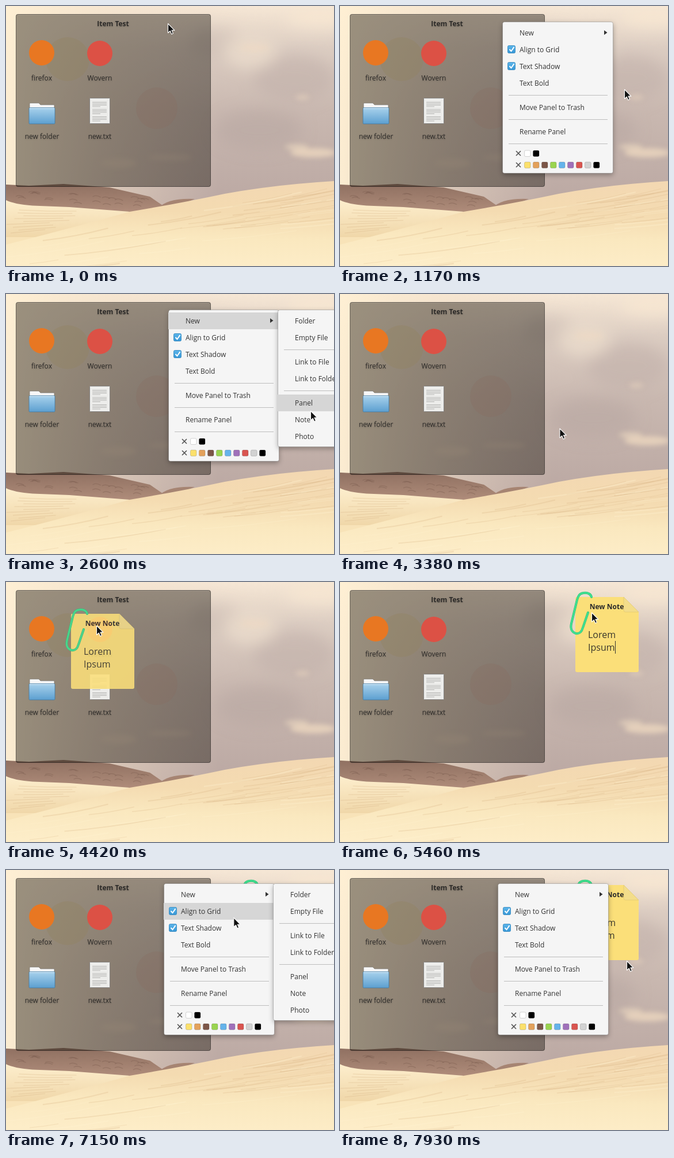
An HTML page for the animation above (8 s loop, 570 px wide and 450 px high).

```html
<!DOCTYPE html>
<html lang="en">
<head>
<meta charset="utf-8">
<title>Desktop panel</title>
<style>
html, body { margin: 0; width: 100%; height: 100%; overflow: hidden; background: #f8e3b8; }
svg { display: block; width: 570px; height: 450px; }
text { font: 12px "Open Sans", "Noto Sans", sans-serif; fill: #333; }
.bold { font-weight: 700; fill: #2b2b2b; }
.mid { text-anchor: middle; }
.body { font-size: 16px; fill: #3b382c; }
.label { fill: #2d2b29; filter: drop-shadow(0 1px 1px rgba(0,0,0,.2)); }
.pop { filter: drop-shadow(0 3px 4px rgba(0,0,0,.32)); }
</style>
</head>
<body>
<svg viewBox="0 0 570 450">
  <defs>
    <linearGradient id="sky" x1="0" y1="0" x2="0" y2="1">
      <stop offset="0" stop-color="#f6e7d5"/>
      <stop offset=".2" stop-color="#dccdc2"/>
      <stop offset=".5" stop-color="#c9b8b0"/>
      <stop offset="1" stop-color="#b9a6a1"/>
    </linearGradient>
    <linearGradient id="glow">
      <stop offset="0" stop-color="#fff0d4" stop-opacity=".95"/>
      <stop offset=".3" stop-color="#f8e6cc" stop-opacity=".5"/>
      <stop offset=".65" stop-color="#f3dfcb" stop-opacity="0"/>
    </linearGradient>
    <linearGradient id="hill" x1="0" y1="0" x2="0" y2="1">
      <stop offset="0" stop-color="#8f7061"/>
      <stop offset="1" stop-color="#b08d7b"/>
    </linearGradient>
    <linearGradient id="flat" x1="0" y1="0" x2="0" y2="1">
      <stop offset="0" stop-color="#fdeecd"/>
      <stop offset="1" stop-color="#f0d7a9"/>
    </linearGradient>
    <linearGradient id="dune" x1=".5" y1="0" x2=".4" y2="1">
      <stop offset="0" stop-color="#f3d8b2"/>
      <stop offset=".35" stop-color="#f4dbb1"/>
      <stop offset=".65" stop-color="#fae8bf"/>
      <stop offset="1" stop-color="#fdedc8"/>
    </linearGradient>
    <linearGradient id="folder" x1="0" y1="0" x2="0" y2="1">
      <stop offset="0" stop-color="#a9d2ec"/>
      <stop offset="1" stop-color="#5c9fd0"/>
    </linearGradient>
    <linearGradient id="check" x1="0" y1="0" x2="0" y2="1">
      <stop offset="0" stop-color="#5cb5ea"/>
      <stop offset="1" stop-color="#3697d6"/>
    </linearGradient>
    <filter id="soft" x="-50%" y="-50%" width="200%" height="200%"><feGaussianBlur stdDeviation="13"/></filter>
    <filter id="haze" x="-50%" y="-50%" width="200%" height="200%"><feGaussianBlur stdDeviation="4"/></filter>
  </defs>

  <rect width="570" height="365" fill="url(#sky)"/>
  <rect width="570" height="365" fill="url(#glow)"/>
  <g filter="url(#soft)">
    <ellipse cx="365" cy="65" rx="45" ry="28" fill="#cfc0b6" opacity=".6"/>
    <ellipse cx="500" cy="125" rx="70" ry="40" fill="#c2b1aa" opacity=".6"/>
    <ellipse cx="425" cy="78" rx="46" ry="30" fill="#ecddcc" opacity=".8"/>
    <ellipse cx="545" cy="20" rx="60" ry="18" fill="#f8e8d3" opacity=".8"/>
    <ellipse cx="440" cy="215" rx="75" ry="35" fill="#b9a8a4" opacity=".6"/>
  </g>
  <g filter="url(#haze)" fill="#efdac1">
    <ellipse cx="534" cy="254" rx="40" ry="8" opacity=".75"/>
    <ellipse cx="505" cy="244" rx="20" ry="5" opacity=".6"/>
    <ellipse cx="195" cy="272" rx="32" ry="8" opacity=".4"/>
    <ellipse cx="285" cy="262" rx="38" ry="5" opacity=".35"/>
    <ellipse cx="515" cy="158" rx="12" ry="4" opacity=".5"/>
    <ellipse cx="432" cy="72" rx="26" ry="8" opacity=".4"/>
  </g>
  <circle cx="107" cy="92" r="38" fill="#ecd296" opacity=".32"/>
  <circle cx="262" cy="177" r="36" fill="#d9a898" opacity=".25"/>

  <path d="M0 309L40 311L100 308L180 314L215 322L250 330L272 345L250 358L130 356L0 348Z" fill="url(#hill)"/>
  <path d="M265 350Q280 332 328 334L300 345Z" fill="#a68472"/>
  <path d="M0 336Q14 343 46 345.500L110 348L215 356L130 400H0Z" fill="url(#flat)"/>
  <path d="M0 413Q130 380 215 356Q300 342 380 325Q470 309 570 303V450H0Z" fill="url(#dune)"/>
  <g id="streaks" fill="none"></g>

  <rect x="17.5" y="14.5" width="338" height="298" rx="3" fill="#1a160f" fill-opacity=".43" stroke="#000" stroke-opacity=".48"/>
  <path d="M20 15.5H353" stroke="#fff" stroke-opacity=".1"/>
  <text class="bold mid label" x="186" y="35">Item Test</text>
  <g id="icons"></g>
  <g id="note"></g>
  <g id="menu"></g>
  <g id="sub"></g>
  <path id="cursor" d="M0 0V16L3.8 12.6L6.2 18.2L8.9 17L6.5 11.6H11.4Z" fill="#111" stroke="#fff" stroke-width="1.1" stroke-linejoin="round"/>
</svg>
<script>
const $ = id => document.getElementById(id);
const LOOP = 8000, STEP = 130;
const MENU = { w: 193, h: 263 }, SUB = { w: 150, h: 238, dx: 190 };

const rect = (x, y, w, h, fill, more = '') =>
  `<rect x="${x}" y="${y}" width="${w}" height="${h}" fill="${fill}" ${more}/>`;
const text = (x, y, s, cls = '') => `<text x="${x}" y="${y}" class="${cls}">${s}</text>`;
const path = (d, stroke, width, more = '') =>
  `<path d="${d}" fill="none" stroke="${stroke}" stroke-width="${width}" ${more}/>`;

// Wind marks on the sand follow the slope of the dune.
let seed = 7;
const rand = () => (seed = seed * 16807 % 2147483647) / 2147483647;
function drawStreaks() {
  let s = '';
  for (let i = 0; i < 46; i++) {
    const x = rand() * 540, len = 50 + rand() * 130, k = rand();
    const y = 418 - x * .19 + k * 58, rise = len * (.19 - k * .09);
    s += path(`M${x} ${y}q${len / 2} ${-rise * .3} ${len} ${-rise}`,
      i % 3 ? '#d8b284' : '#fff2d2', .8 + rand() * 1.4, 'opacity=".28"');
  }
  for (let i = 0; i < 9; i++)
    s += path(`M${rand() * 40} ${353 + i * 5}q50 ${3 - i} ${100 - i * 5} ${2 - i}`, '#d5b184', 1, 'opacity=".4"');
  for (let i = 0; i < 24; i++) {
    const x = 15 + rand() * 225;
    s += path(`M${x} ${319 + x * .055 + rand() * 16}q6 -4 14 1`, '#77594d', 1.2, 'opacity=".4"');
  }
  return s;
}

function drawIcons() {
  let s = '<circle cx="62" cy="81" r="22" fill="#e87722"/><circle cx="163" cy="82" r="22" fill="#dc5145"/>';
  s += '<path d="M41 180V169q0-1 1-1H57l3 3H83q1 0 1 1v10Z" fill="#f7f7f7" stroke="#77736f" stroke-width=".7"/>';
  s += rect(40, 176, 45, 28, 'url(#folder)', 'rx="1.5" stroke="#3f789f" stroke-width=".8"');
  s += path('M41 177.5H84', '#d4eafa', 1);
  s += rect(145.5, 159.5, 35, 44, '#ededeb', 'rx="1" stroke="#777" stroke-width=".8"');
  for (let i = 0; i < 14; i++)
    if (i % 5 !== 4) s += path(`M150 ${166.5 + i * 2.5}h${i % 5 === 3 ? 14 : 25}`, '#b4b4b2', 1);
  const labels = [['firefox', 62, 129], ['Wovern', 163, 129], ['new folder', 62.5, 230], ['new.txt', 163, 230]];
  return s + labels.map(([n, x, y]) => text(x, y, n, 'mid label')).join('');
}

function drawNote() {
  const clip = 'M28 0C27 -6 20 -8 14 -7C7 -6 5 -2 3 5L-7 46C-9 55 -6 61 1 63C8 64 11 60 13 53L22 27';
  return '<path d="M2 0H84L110 26V127q0 3-3 3H3q-3 0-3-3V2q0-2 2-2Z" fill="#fbdf79"/>' +
    '<path d="M84 0L110 26H87q-3 0-3-3Z" fill="#f3dd8a" stroke="#dcc46c" stroke-width=".6"/>' +
    text(54.5, 21, 'New Note', 'bold mid') +
    text(22, 71, 'Lorem', 'body') + text(22, 93, 'Ipsum', 'body') +
    path('M69.5 76V98', '#333', 1, 'id="caret"') +
    path(clip, '#2cb977', 4, 'stroke-linecap="round"') +
    path(clip, '#3fe08f', 3, 'stroke-linecap="round"');
}

const ROWS = [[19, 'New'], [48, 'Align to Grid'], [77, 'Text Shadow'], [106, 'Text Bold'],
  [148, 'Move Panel to Trash'], [190, 'Rename Panel']];
const SUBROWS = [[19, 'Folder'], [48, 'Empty File'], [90, 'Link to File'], [119, 'Link to Folder'],
  [161, 'Panel'], [190, 'Note'], [219, 'Photo']];
const SWATCHES = ['#fbe06c', '#e3a15b', '#7c5648', '#9ad450', '#65b3ea', '#a071ba', '#d95550', '#d2d2d2', '#000'];

function drawList({ w, h }, rows, seps) {
  return rect(.5, .5, w - 1, h - 1, '#f5f5f5', 'rx="3.5" class="pop"') +
    rect(.5, .5, w - 1, h - 1, 'none', 'rx="3.5" stroke="#000" stroke-opacity=".2"') +
    rect(0, 5, w, 29, '#d6d6d6', 'class="hover"') +
    seps.map(y => path(`M11 ${y}H${w - 10}`, '#bdbdbd', 1)).join('') +
    rows.map(([y, s]) => text(30, y + 4.5, s)).join('');
}

function drawMenu() {
  let s = drawList(MENU, ROWS, [127.5, 169.5, 211.5]);
  s += '<path d="M177 15L182.5 19L177 23Z" fill="#333"/>';
  for (const y of [48, 77])
    s += rect(9.5, y - 6.5, 13, 13, 'url(#check)', 'rx="2" stroke="#2f83ba" stroke-width=".8"') +
      path(`M12.5 ${y}l3 3.2L20.5 ${y - 4}`, '#fff', 2);
  [['#fff', '#000'], SWATCHES].forEach((row, r) => {
    const y = 228 + r * 20;
    s += path(`M24 ${y - 4}l8 8m0 -8l-8 8`, '#555', 1.7);
    row.forEach((c, i) => s += rect(38.5 + i * 15, y - 5, 10.5, 10.5, c,
      'rx="2" stroke="#000" stroke-opacity=".2" stroke-width=".8"'));
  });
  return s;
}

$('streaks').innerHTML = drawStreaks();
$('icons').innerHTML = drawIcons();
$('note').innerHTML = drawNote();
$('menu').innerHTML = drawMenu();
$('sub').innerHTML = drawList(SUB, SUBROWS, [69.5, 140.5]);

// Each track row: time, then values.
const POINTER = [[260, 281.5, 30.5], [520, 330, 45], [650, 345, 48], [1040, 494.5, 144.5], [1170, 494.5, 144.5],
  [1690, 394, 46], [1950, 394, 46], [2210, 485, 50], [2600, 529.5, 202.5], [2860, 529, 214], [2990, 529, 214],
  [3640, 302, 243], [4290, 157.5, 75.5], [4680, 157.5, 75.5], [5200, 453, 46], [5330, 453, 46], [5460, 437.5, 53],
  [5850, 274, 26], [5980, 274, 26], [6370, 327.5, 41.5], [6890, 340, 42], [7540, 498.5, 157.5]];
const NOTE_POS = [[4680, 113, 55], [5200, 409, 26]];
const NOTE_FADE = [[4160, 0], [4420, .87], [4550, 1]];
const MENU_FADE = [[130, 0], [390, 1], [2860, 1], [3120, 0], [5850, 0], [6110, 1]];
const SUB_FADE = [[520, 0], [780, 1], [910, 1], [1040, 0], [1690, 0], [1950, 1], [2860, 1], [2990, 0],
  [6240, 0], [6370, .86], [6500, 1], [7150, 1], [7410, 0]];

const linear = k => k, smooth = k => k * k * (3 - 2 * k);
function at(track, t, ease = linear) {
  const i = track.findIndex(row => row[0] > t);
  if (i < 0) return track[track.length - 1].slice(1);
  if (i === 0) return track[0].slice(1);
  const a = track[i - 1], b = track[i], k = ease((t - a[0]) / (b[0] - a[0]));
  return a.slice(1).map((v, n) => v + (b[n + 1] - v) * k);
}

function place(el, x, y, alpha, { w, h } = { w: 0, h: 0 }) {
  const s = w ? .87 + .13 * alpha : 1;
  el.setAttribute('transform', `translate(${x + w * (1 - s) / 2} ${y + h * (1 - s) / 2}) scale(${s})`);
  el.setAttribute('opacity', alpha);
}

function highlight(el, row) {
  const bar = el.querySelector('.hover');
  bar.setAttribute('visibility', row ? 'inherit' : 'hidden');
  if (row) bar.setAttribute('y', row[0] - 14);
}

const rowAt = (rows, w, x, y) =>
  x >= 0 && x < w ? rows.find(([c]) => y >= c - 14 && y < c + 15) : undefined;

function draw(t) {
  const [cx, cy] = at(POINTER, t, smooth);
  const [mx, my] = t < 4000 ? [282, 27] : [274, 23];
  const [menuAlpha] = at(MENU_FADE, t), [subAlpha] = at(SUB_FADE, t);
  const sx = mx + SUB.dx;

  place($('cursor'), cx, cy, 1);
  place($('menu'), mx, my, menuAlpha, MENU);
  place($('sub'), sx, my, subAlpha, SUB);
  const inSub = subAlpha > 0 && cx >= sx;
  highlight($('sub'), inSub && rowAt(SUBROWS, SUB.w, cx - sx, cy - my));
  highlight($('menu'), inSub ? ROWS[0] : rowAt(ROWS, MENU.w, cx - mx, cy - my));

  const [nx, ny] = at(NOTE_POS, t, smooth);
  place($('note'), nx, ny, at(NOTE_FADE, t)[0]);
  $('caret').setAttribute('visibility', t >= 5330 && t < 5850 ? 'visible' : 'hidden');
}

const start = performance.now();
function tick() {
  const t = (performance.now() - start) % LOOP;
  draw(Math.floor(t / STEP) * STEP);
  requestAnimationFrame(tick);
}
tick();
</script>
</body>
</html>
```
